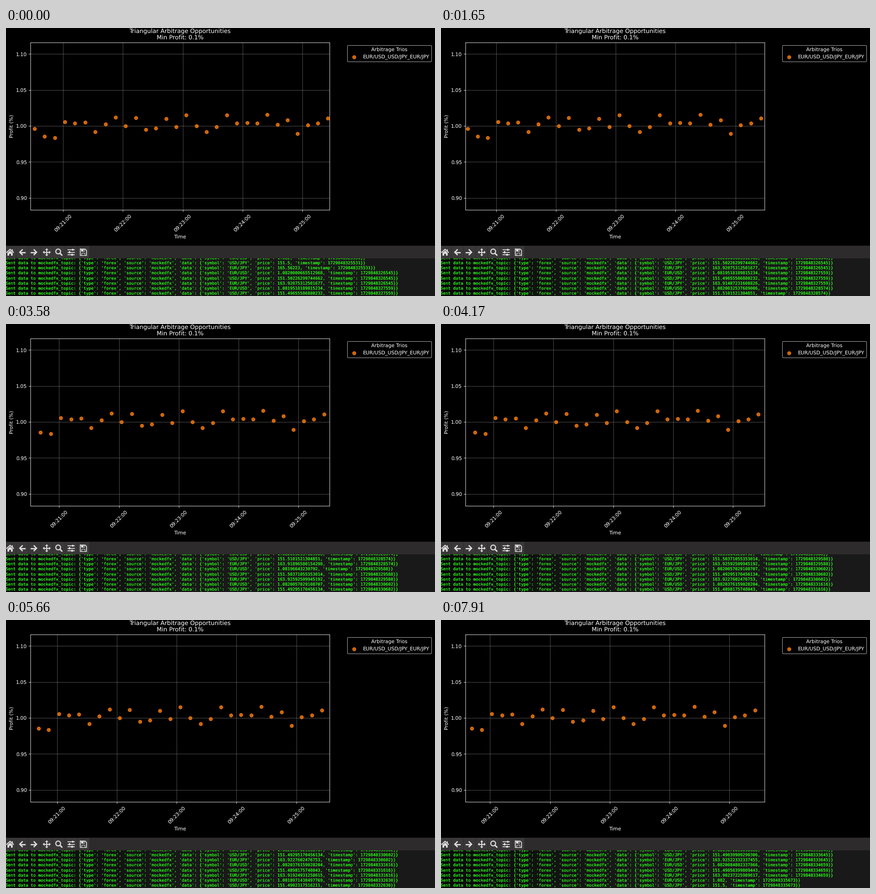
A matplotlib script that plays this animation: 948 by 591 pixels, repeating every 8000 ms.

```python
import numpy as np
import matplotlib.pyplot as plt
from matplotlib.animation import FuncAnimation
from matplotlib.patches import Circle, Polygon, Rectangle

W, H, DPI = 948, 591, 79
LOOP, TICK = 8000, 20
PX = 72 / DPI  # points per pixel
rng = np.random.default_rng(7)

plt.style.use("dark_background")
plt.rcParams.update({"font.family": "DejaVu Sans", "text.hinting": "no_hinting"})
fig = plt.figure(figsize=(W / DPI, H / DPI), dpi=DPI, facecolor="black")

# ---------- chart: x is seconds after 09:21:00 ----------
LEFT, RIGHT, TOP, BOTTOM = 54.2, 715.2, 32.2, 401.2
WINDOW, START, STEP = 300, -32.68, 0.504
# plotted series, in 0.0001 steps around 1
profit = 1 + 1e-4 * np.array([
    -39, -143, -166, 58, 39, 48, -85, 27, 119, -1, 114, -49, -29, 100, -11,
    150, -1, -82, -11, 150, 39, 44, 39, 160, 22, 79, -107, 12, 39, 107])
when = -28.68 + 10.148 * np.arange(len(profit))

ax = fig.add_axes([LEFT / W, 1 - BOTTOM / H, (RIGHT - LEFT) / W, (BOTTOM - TOP) / H])
dots = ax.scatter(when, profit, s=47, color="tab:orange", alpha=0.8, zorder=3,
                  label="EUR/USD_USD/JPY_EUR/JPY")
ax.set_title("Triangular Arbitrage Opportunities\nMin Profit: 0.1%")
ax.set_xlabel("Time")
ax.set_ylabel("Profit (%)")
ax.set_ylim(0.88334, 1.11578)
ax.set_yticks(np.linspace(0.9, 1.1, 5))
ax.yaxis.set_major_formatter("{x:.2f}")
ax.set_xticks(range(0, 241, 60), [f"09:{m}:00" for m in range(21, 26)], rotation=45)
ax.grid(True, alpha=0.35)
ax.set_axisbelow(True)
ax.legend(title="Arbitrage Trios", bbox_to_anchor=(1.05, 1), loc="upper left")

# ---------- pixel layer for toolbar and terminal ----------
px = fig.add_axes([0, 0, 1, 1], zorder=-1)
px.axis("off")

ICON = "#dcdcdc"
BUTTON = "#3a3838"


def box(x0, y0, x1, y1, color, z):
    px.add_patch(Rectangle((x0, y0), x1 - x0, y1 - y0, fc=color, ec="none", zorder=z))


def stroke(points, width, cap="butt"):
    xs, ys = zip(*points)
    px.plot(xs, ys, color=ICON, lw=width * PX, solid_capstyle=cap,
            solid_joinstyle="miter", zorder=5)


def shape(points):
    px.add_patch(Polygon(points, fc=ICON, ec="none", zorder=5))


# terminal background, darker to the left
shade = np.interp(np.arange(W), [0, 400], [10, 25]) / 255
px.imshow(shade[None, :], cmap="gray", vmin=0, vmax=1, aspect="auto",
          extent=(0, W, H, 508), zorder=1)
px.set_xlim(0, W)
px.set_ylim(H, 0)

box(0, 480, W, 508, "#2d2b2b", 3)
for right in np.arange(22.5, 185, 27):
    box(right - 26, 481, right, 507.5, BUTTON, 4)

CY = 494.5
# home
stroke([(0.8, 495.5), (9, 488), (17.2, 495.5)], 2.2)
shape([(3.2, 496), (9, 490.8), (14.8, 496), (14.8, 502), (3.2, 502)])
box(7.4, 497.5, 10.6, 502, BUTTON, 6)
box(13, 487.5, 15, 492, ICON, 5)
# back and forward
for cx, d in ((36, 1), (62, -1)):
    stroke([(cx + 7.5 * d, CY), (cx - 5.5 * d, CY)], 2.8)
    stroke([(cx + 0.8 * d, CY - 6.3), (cx - 5.5 * d, CY), (cx + 0.8 * d, CY + 6.3)], 2.8)
# pan
for dx, dy in ((1, 0), (-1, 0), (0, 1), (0, -1)):
    stroke([(90, CY), (90 + 6 * dx, CY + 6 * dy)], 2.2)
    shape([(90 + 8.8 * dx, CY + 8.8 * dy),
           (90 + 5 * dx + 3.6 * dy, CY + 5 * dy + 3.6 * dx),
           (90 + 5 * dx - 3.6 * dy, CY + 5 * dy - 3.6 * dx)])
# zoom
px.add_patch(Circle((115.3, 492.8), 5.3, fc="none", ec=ICON, lw=2.3 * PX, zorder=5))
stroke([(119.4, 496.9), (123.6, 501.1)], 3, "round")
# sliders
for y, knob in ((489, 147.5), (494.5, 140.5), (500, 146)):
    stroke([(136, y), (152, y)], 1.8)
    box(knob - 1.6, y - 2.3, knob + 1.6, y + 2.3, ICON, 6)
# save
stroke([(164.2, 487.5), (175, 487.5), (178, 490.5), (178, 501.5), (164.2, 501.5),
        (164.2, 487.5), (166, 487.5)], 1.8)
box(166.5, 487.5, 174.5, 492.8, ICON, 5)
box(171.3, 488.5, 173.2, 491.5, BUTTON, 6)
box(166.8, 495.8, 175.4, 501.5, ICON, 5)
box(168, 497, 174.2, 500.8, BUTTON, 6)

# ---------- terminal log ----------
BASE = {"EUR/USD": 1.082, "USD/JPY": 151.5, "EUR/JPY": 163.923}


def quote(pair, n):
    """Every tenth round is a plain price with a 1% gap; the rest wander."""
    if n % 10:
        return float(BASE[pair] * (1 + rng.normal(0, 5e-5)))
    return round(BASE[pair] * 1.01, 5) if pair == "EUR/JPY" else BASE[pair]


def message(pair, n):
    stamp = 1729848325531 + round(1014.2 * n)
    return ("Sent data to mockedfx_topic: {'type': 'forex', 'source': 'mockedfx', "
            f"'data': {{'symbol': '{pair}', 'price': {quote(pair, n)}, "
            f"'timestamp': {stamp}}}}}")


log = [message(pair, n) for n in range(11) for pair in BASE]

ROWS, PITCH, CHAR = 8, 11.1, 5.56


def log_row(i):
    return px.text(-0.8, 511 + PITCH * i, "", family="DejaVu Sans Mono",
                   size=CHAR / 0.602 * PX, color="#28fe14", va="baseline", zorder=2)


# two copies per row give the heavier strokes of a terminal
rows = [(log_row(i), log_row(i)) for i in range(ROWS)]

# ---------- motion: both panels advance in hard steps on one beat ----------
BEAT = 148.9
chart_at = BEAT * (1 + (10 * np.arange(16) + 1) // 3)
log_at = BEAT * np.round(5 + 6.85 * np.arange(8))


def update(k):
    t = (k + 0.5) * TICK
    left = START + STEP * np.searchsorted(chart_at, t, side="right")
    ax.set_xlim(left, left + WINDOW)
    live = when >= left
    dots.set_offsets(np.column_stack([when[live], profit[live]]))
    first = 3 * np.searchsorted(log_at, t, side="right")
    for pair, line in zip(rows, log[first:first + ROWS]):
        for row in pair:
            row.set_text(line)
    return [dots]


anim = FuncAnimation(fig, update, frames=LOOP // TICK, interval=TICK,
                     repeat=True, repeat_delay=0, blit=False)
plt.show()
```
